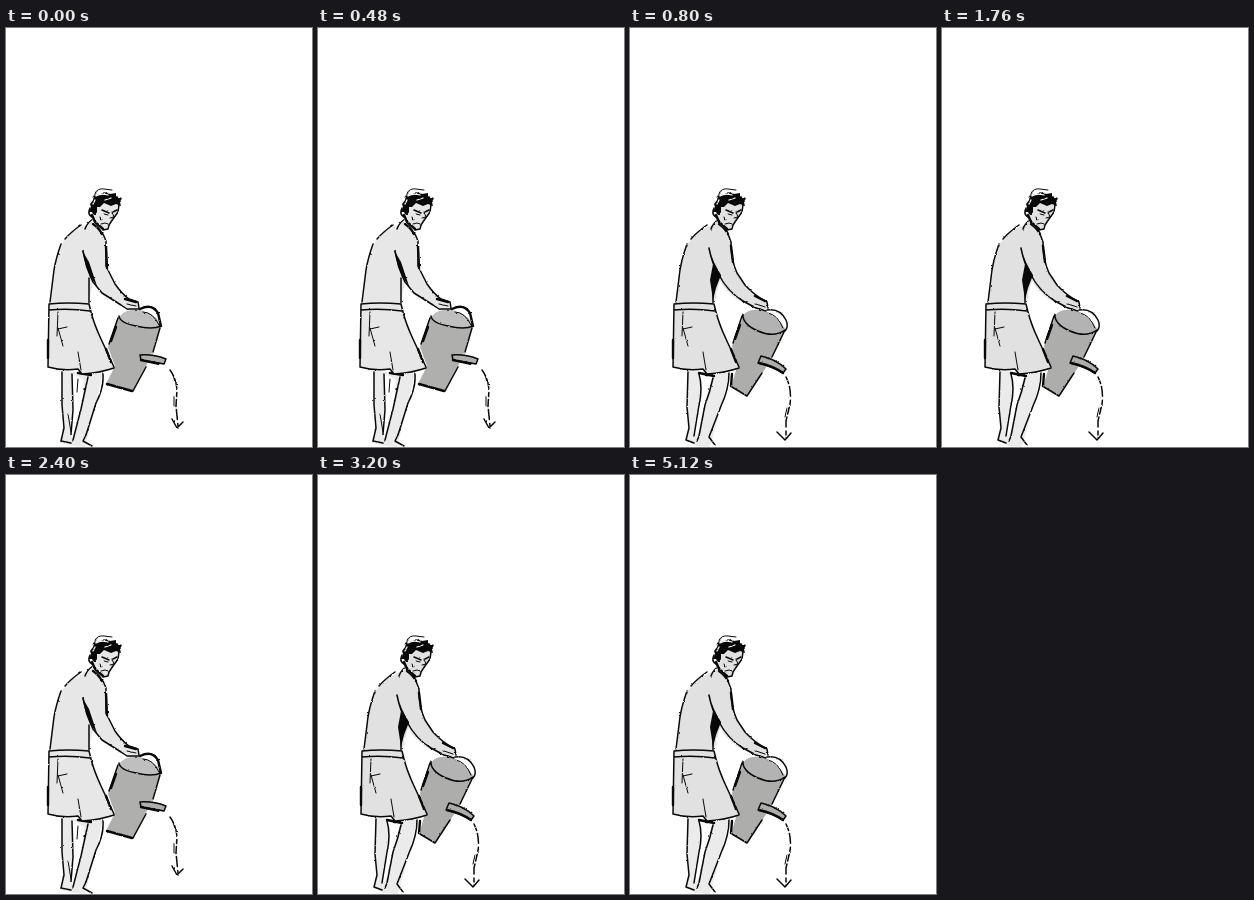
An HTML page for the animation above (6400 ms loop, 306 by 419 pixels).

```html
<!DOCTYPE html>
<html lang="en">
<head>
<meta charset="utf-8">
<title>Watering</title>
<style>
  html, body { margin: 0; width: 100%; height: 100%; overflow: hidden; background: #fff; }
  svg { display: block; width: 306px; height: 419px; }
  path { stroke-linecap: round; stroke-linejoin: round; }
  .ink { fill: none; stroke: #080808; stroke-width: 1.5; }
  .thin { stroke-width: 1; }
  .bold { stroke-width: 2.4; }
  .black { fill: #080808; }
  .white { fill: none; stroke: #fff; stroke-width: 1.3; }
  .gap { fill: #fff; }
  .skin { fill: var(--skin); }
  .can { fill: var(--can); }
  .lid { fill: var(--lid); }
  .leg { fill: #ebebeb; }
  .water { stroke-dasharray: 7 3 10 4 4 3; }
  .pose { filter: url(#rough); }
  #high { --skin: #e7e7e7; --can: #afafad; --lid: #bfbfbf; }
  #low { --skin: #e1e1e1; --can: #adadab; --lid: #b3b3b3; }
</style>
</head>
<body>
<svg viewBox="0 0 306 419">
  <defs>
    <filter id="rough" filterUnits="userSpaceOnUse" x="0" y="0" width="306" height="419" color-interpolation-filters="sRGB">
      <feTurbulence type="fractalNoise" baseFrequency=".25" numOctaves="2" seed="4"/>
      <feDisplacementMap in="SourceGraphic" scale="2" xChannelSelector="R" yChannelSelector="G"/>
    </filter>
    <g id="head">
      <path class="skin" d="M90 178 L97 174 L112 176 L112 183 L107 191 L103 197 L102 201 L96 201 L87 194 L85 187 Z"/>
      <path class="black" d="M83 184 L85 179 L84 176 L87 172 L88 168 L94 166 L101 164 L104 166 L110 165 L110 168 L116 170 L114 174 L115 178 L110 176 L105 178 L98 175 L94 179 L91 179 L91 184 L89 187 L86 184 Z"/>
      <path class="ink thin" d="M89 165 Q92 160 98 161 L106 162 M87 169 L91 164"/>
      <path class="white" d="M90 168 Q95 165 102 167 M87 176 L89 172 M99 172 L105 170"/>
      <path class="ink" d="M84 180 Q81 186 86 189 M113 177 L112 184 L107 191 L103 197 L102 201 L97 202"/>
      <path class="ink bold" d="M86 187 L89 194 L97 201 M87 182 L88 185"/>
      <path class="ink" d="M96 182 L103 185 M107 184 L111 182"/>
      <path class="ink thin" d="M98 186 L102 187 M106 184 L108 189 L104 190 M95 196 L99 195 L102 196 M94 189 L95 192"/>
    </g>
    <g id="torso">
      <path class="skin" d="M86 194 L95 203 L100 213 L99 236 L88 256 L83 276 L45 276 L49 240 L56 216 L68 204 Z"/>
      <path class="ink" d="M76 197 Q66 204 60 211 M56 216 Q51 230 49 242 L45 274"/>
      <path class="ink" d="M88 191 Q82 195 80 201"/>
      <path class="ink bold" d="M88 196 Q94 200 97 206"/>
    </g>
    <g id="shorts">
      <path class="skin" d="M43 275 L83 275 L85 284 L94 309 L108 340 L92 345 L76 346 L73 342 L57 342 L42 339 L43 300 Z"/>
      <path class="ink" d="M43 276 Q62 274 83 276 M43 282 Q63 280 84 283 M43 276 L42 339 Q56 343 72 341 L76 346 Q93 345 108 340 M83 276 L85 284 Q88 296 95 311 L108 339"/>
      <path class="ink thin" d="M52 284 L51 308 M52 300 L57 318 M52 301 L61 299 M75 342 L72 324"/>
      <path class="ink bold" d="M100 321 L105 334 M42 312 L42 330"/>
    </g>
  </defs>

  <g id="high" class="pose">
    <path class="leg" d="M55 343 L56 377 L58 402 L55 415 L68 418 L79 419 L89 380 L97 345 Z"/>
    <path class="gap" d="M66 345 L67 385 L66 412 L71 395 L76 378 L78 352 Z"/>
    <path class="ink" d="M56 344 L56 377 L58 400 L55 413 L65 415 M66 346 L67 382 L65 406 M82 349 Q79 363 75 381 L67 412 M97 346 Q98 360 90 375 L80 407 L77 413 L86 418"/>
    <path class="ink thin" d="M72 351 L71 364 M62 386 L65 404"/>
    <path class="ink bold" d="M72 345 L85 347"/>
    <path class="can" d="M113 288 L154 299 L146 325 L140 338 L127 364 L100 356 L109 338 L102 319 Z"/>
    <path class="lid" d="M114 288 Q121 279 138 283 Q155 289 155 298 Q144 303 129 298 Q112 295 114 288 Z"/>
    <path class="gap" d="M137 283 Q148 279 153 293 Q147 286 137 283 Z"/>
    <path class="ink" d="M112 290 L103 316 M154 300 L147 324 M140 339 L127 363 M113 288 Q114 295 130 298 Q146 302 155 298"/>
    <path class="ink bold" d="M110 299 L105 313 M101 356 L126 363"/>
    <path class="can ink" d="M134 327 Q147 326 160 331 L158 336 L135 332 Z"/>
    <path class="ink bold" d="M135 332 L154 336"/>
    <path class="ink bold" d="M134 281 Q146 275 152 285 L155 298"/>
    <path class="ink thin" d="M137 284 Q147 284 153 297"/>
    <use href="#torso" x="-1"/>
    <path class="skin" d="M79 222 L100 213 L100 238 L109 257 L121 269 L133 275 L133 281 L121 282 L113 275 L94 264 L84 248 Z"/>
    <path class="ink" d="M97 206 L100 213 L100 238 L109 256 Q116 266 123 271 L132 274 L133 280 M77 223 Q81 242 87 254 L96 265 L115 277 L121 281 L133 281"/>
    <path class="ink bold" d="M100 218 L101 240 M119 271 L130 274"/>
    <path class="black" d="M76 222 L83 234 L91 258 L85 250 L80 239 Z"/>
    <path class="ink" d="M83 250 L83 275"/>
    <path class="ink thin" d="M121 276 L130 278"/>
    <use href="#head"/>
    <use href="#shorts"/>
    <path class="ink water" d="M164 342 Q170 350 171 362 L170 378 L172 398"/>
    <path class="ink thin" d="M167 347 L169 354 M168 369 L168 378"/>
    <path class="ink" d="M166 391 L171 400 L177 394"/>
  </g>

  <g id="low" class="pose">
    <path class="leg" d="M57 343 L57 379 L59 402 L56 413 L66 418 L80 419 L90 383 L99 345 Z"/>
    <path class="gap" d="M69 345 L71 366 L64 410 L71 400 L75 376 L82 349 Z"/>
    <path class="ink" d="M58 344 L57 379 L59 400 L56 412 L64 415 M69 346 Q73 360 69 377 L64 408 M83 350 Q80 364 75 377 L69 408 L67 413 M99 345 Q99 361 91 378 L79 409 L85 417"/>
    <path class="ink bold" d="M69 345 L84 348 M76 347 L82 347"/>
    <path class="can" d="M114 286 L155 302 L142 330 L133 344 L117 368 L101 359 L107 339 L102 318 Z"/>
    <path class="lid" d="M114 286 Q123 278 139 285 Q155 294 155 302 Q143 310 128 303 Q111 296 114 286 Z"/>
    <path class="gap" d="M137 284 Q149 281 154 299 Q149 291 137 284 Z"/>
    <path class="ink" d="M112 288 L103 315 M102 359 L117 368 L132 345 M155 302 L142 329 M113 286 Q112 296 128 303 Q144 310 155 302"/>
    <path class="ink bold" d="M110 297 L105 311 M102 346 L101 358"/>
    <path class="can ink" d="M131 328 Q146 331 156 341 L153 345 Q142 338 128 335 Z"/>
    <path class="ink bold" d="M129 335 Q143 338 153 345"/>
    <path class="ink" d="M137 282 Q150 280 156 292 Q159 299 155 303"/>
    <path class="ink thin" d="M138 285 Q148 287 153 300"/>
    <use href="#torso" x="1"/>
    <path class="skin" d="M79 222 L100 212 L102 232 L109 248 L123 266 L137 274 L138 281 L126 281 L106 271 L94 259 L86 244 Z"/>
    <path class="ink" d="M98 206 L101 214 Q101 232 107 245 L115 257 Q125 268 137 274 L138 280 M79 220 Q82 236 89 247 Q98 264 113 273 L126 280 L136 283"/>
    <path class="ink bold" d="M101 218 L103 234 M125 268 L135 273"/>
    <path class="black" d="M78 219 Q83 234 91 247 L86 260 L83 272 L80 252 L83 236 Z"/>
    <path class="ink" d="M83 258 L83 275"/>
    <path class="ink thin" d="M126 276 L135 279"/>
    <use href="#head"/>
    <use href="#shorts" x="1"/>
    <path class="ink water" d="M156 349 Q162 361 160 376 L156 393 L156 410"/>
    <path class="ink thin" d="M157 380 L155 389"/>
    <path class="ink" d="M147 404 L155 412 L161 405"/>
  </g>
</svg>
<script>
  const LOOP = 6400;
  // start time of each pose, in ms
  const steps = [[0, "high"], [800, "low"], [2400, "high"], [3200, "low"]];
  const poses = ["high", "low"].map(id => document.getElementById(id));

  function draw() {
    const t = performance.now() % LOOP;
    const pose = steps.filter(([start]) => start <= t).pop()[1];
    for (const g of poses) g.style.display = g.id === pose ? "" : "none";
    requestAnimationFrame(draw);
  }
  draw();
</script>
</body>
</html>
```
